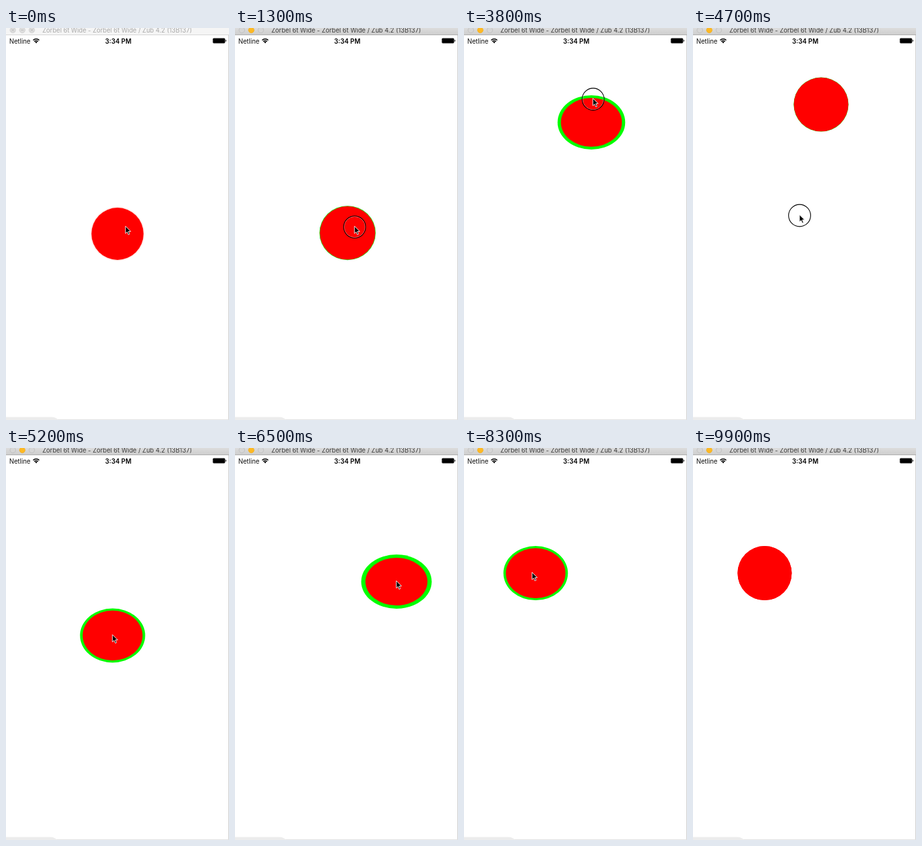
An HTML page that plays this animation: 342 px wide and 600 px high, repeating every 10 s.

```html
<!DOCTYPE html>
<html lang="en">
<head>
<meta charset="utf-8">
<title>Tap to move</title>
<style>
  html, body { margin: 0; width: 100%; height: 100%; overflow: hidden; background: #fff; }
  svg { display: block; width: 342px; height: 600px; font-family: Inter, Roboto, sans-serif; }
</style>
</head>
<body>
<svg viewBox="0 0 342 600" xmlns="http://www.w3.org/2000/svg">
  <defs>
    <linearGradient id="chrome" x1="0" y1="0" x2="0" y2="1">
      <stop offset="0" stop-color="#dcdcdc"/>
      <stop offset="1" stop-color="#cecece"/>
    </linearGradient>
  </defs>
  <rect width="342" height="600" fill="#fff"/>

  <rect id="bar" width="342" height="10"/>
  <rect id="barLine" y="10" width="342" height="1"/>
  <g id="lights" stroke-width=".8">
    <circle cx="10.5" cy="3.2" r="4.3"/>
    <circle cx="25" cy="3.2" r="4.3"/>
    <circle cx="39.6" cy="3.2" r="4.3"/>
  </g>
  <g id="marks" stroke="#bdbdbd" stroke-width="1">
    <path d="M8.5 1.2l4 4m0-4l-4 4M23 3.2h4M37.6 1.2l4 4m0-4l-4 4"/>
  </g>
  <text id="title" x="55.8" y="7" font-size="9.65">Zorbel 6t Wide - Zorbel 6t Wide / Zub 4.2 (13B137)</text>

  <text x="5" y="23.5" font-size="9.8" fill="#111">Netline</text>
  <g fill="none" stroke="#000" stroke-width="1.5">
    <path d="M41.6 18.7a6.6 6.6 0 0 1 9.4 0M43.4 20.7a4 4 0 0 1 5.8 0"/>
    <path d="M46.3 23.4l-1.7-1.7a2.4 2.4 0 0 1 3.4 0z" fill="#000" stroke="none"/>
  </g>
  <text x="172.2" y="23.5" font-size="9.9" font-weight="600" text-anchor="middle">3:34 PM</text>
  <rect x="317.3" y="15.8" width="18.6" height="7.4" rx="1.4" stroke="#555" stroke-width=".6"/>
  <path d="M336.6 17.8q1.2.3 1.2 1.7t-1.2 1.7z"/>

  <rect x="341" y="11" width="1" height="589" fill="#cfcfcf"/>
  <rect y="599" width="342" height="1" fill="#e2e2e2"/>
  <path id="tab" fill="#ececec"/>

  <g id="ball">
    <circle id="edge" r="41.5"/>
    <circle id="core" fill="#f00"/>
  </g>
  <g id="ring" fill="none">
    <circle r="16.1" stroke="#fff" stroke-opacity=".5" stroke-width=".8"/>
    <circle r="16.9" stroke="#000" stroke-width="1.1"/>
  </g>
  <path id="cursor" d="M0 0V11.2L2.6 8.8L4.4 13L6.3 12.2L4.5 8.1H8.1Z" fill="#000" stroke="#fff" stroke-width=".9"/>
</svg>
<script>
const LOOP = 10000, STEP = 100, MOVE = 400, RADIUS = 41.5;
const $ = id => document.getElementById(id);
const set = (el, attrs) => { for (const k in attrs) el.setAttribute(k, attrs[k]); };
const show = (el, on) => set(el, { visibility: on ? "visible" : "hidden" });
const clamp = v => Math.max(0, Math.min(1, v));
const mix = (a, b, p) => a + (b - a) * p;

// Cubic ease-in-out with control points (.42, 0) and (.58, 1)
function ease(x) {
  let lo = 0, hi = 1;
  for (let i = 0; i < 24; i++) {
    const s = (lo + hi) / 2;
    if (1.26 * s * (1 - s) * (1 - s) + 1.74 * s * s * (1 - s) + s ** 3 < x) lo = s;
    else hi = s;
  }
  return lo * lo * (3 - 2 * lo);
}

const home = { x: 171, y: 315 };
const taps = [
  { at: 1200, x: 183.5, y: 304.6 },
  { at: 3518, x: 198, y: 109 },
  { at: 4640, x: 163.5, y: 287 },
  { at: 6072, x: 247.6, y: 204.5 },
  { at: 7730, x: 109.9, y: 191.6 }
];
// Pointer travel: start, end, destination
const trips = [
  [2900, 3400, 198, 109],
  [4050, 4600, 163.5, 287],
  [5450, 6000, 247.6, 204.5],
  [6700, 7450, 109.9, 191.6],
  [8200, 8900, -20, 190]
];
const presses = [[1200, 1500], [2500, 2800], [3500, 3900], [4600, 5000], [6050, 6400], [7600, 8000]];

function ballAt(t) {
  let { x, y } = home, stretch = 0;
  for (const tap of taps) {
    if (t < tap.at) break;
    const p = ease(clamp((t - tap.at) / MOVE));
    x = mix(x, tap.x, p);
    y = mix(y, tap.y, p);
    stretch = p - ease(clamp((t - tap.at - MOVE) / MOVE));
  }
  return { x, y, stretch };
}

function pointerAt(t) {
  let { x, y } = taps[0];
  for (const [from, to, tx, ty] of trips) {
    const p = ease(clamp((t - from) / (to - from)));
    x = mix(x, tx, p);
    y = mix(y, ty, p);
  }
  return { x, y };
}

function drawChrome(active) {
  set($("bar"), { fill: active ? "url(#chrome)" : "#f5f5f5" });
  set($("barLine"), { fill: active ? "#aeaeae" : "#d6d6d6" });
  set($("title"), { fill: active ? "#3c3c3c" : "#a9a9a9" });
  [...$("lights").children].forEach((dot, i) => {
    const lit = active && i === 1;
    set(dot, { fill: lit ? "#fdb924" : active ? "#d6d6d6" : "#dedede",
               stroke: lit ? "#f0ae25" : active ? "#bcbcbc" : "#cecece" });
  });
  show($("marks"), !active);
  const w = active ? 78 : 80;
  set($("tab"), { d: `M0 595.5H${w - 10}Q${w - 3} 595.5 ${w} 600H0Z` });
}

function draw(t) {
  drawChrome(t >= 1100);

  const ball = ballAt(t), idle = t < taps[0].at;
  set($("ball"), { transform: `translate(${ball.x} ${ball.y}) scale(${1 + 0.305 * ball.stretch} 1)` });
  set($("edge"), { fill: idle ? "#ffe9e4" : ball.stretch > 0.02 ? "#0f0" : "#f00" });
  set($("core"), { r: idle ? 39.9 : RADIUS - 5 * ball.stretch });

  const tip = pointerAt(t);
  set($("cursor"), { transform: `translate(${tip.x - 0.3} ${tip.y - 1.3})` });
  set($("ring"), { transform: `translate(${tip.x} ${tip.y})` });
  show($("cursor"), t < 8900);
  show($("ring"), presses.some(([from, to]) => t >= from && t < to));
}

const start = performance.now();
function tick() {
  const t = (performance.now() - start) % LOOP;
  draw(Math.floor(t / STEP) * STEP);
  requestAnimationFrame(tick);
}
draw(0);
requestAnimationFrame(tick);
</script>
</body>
</html>
```
